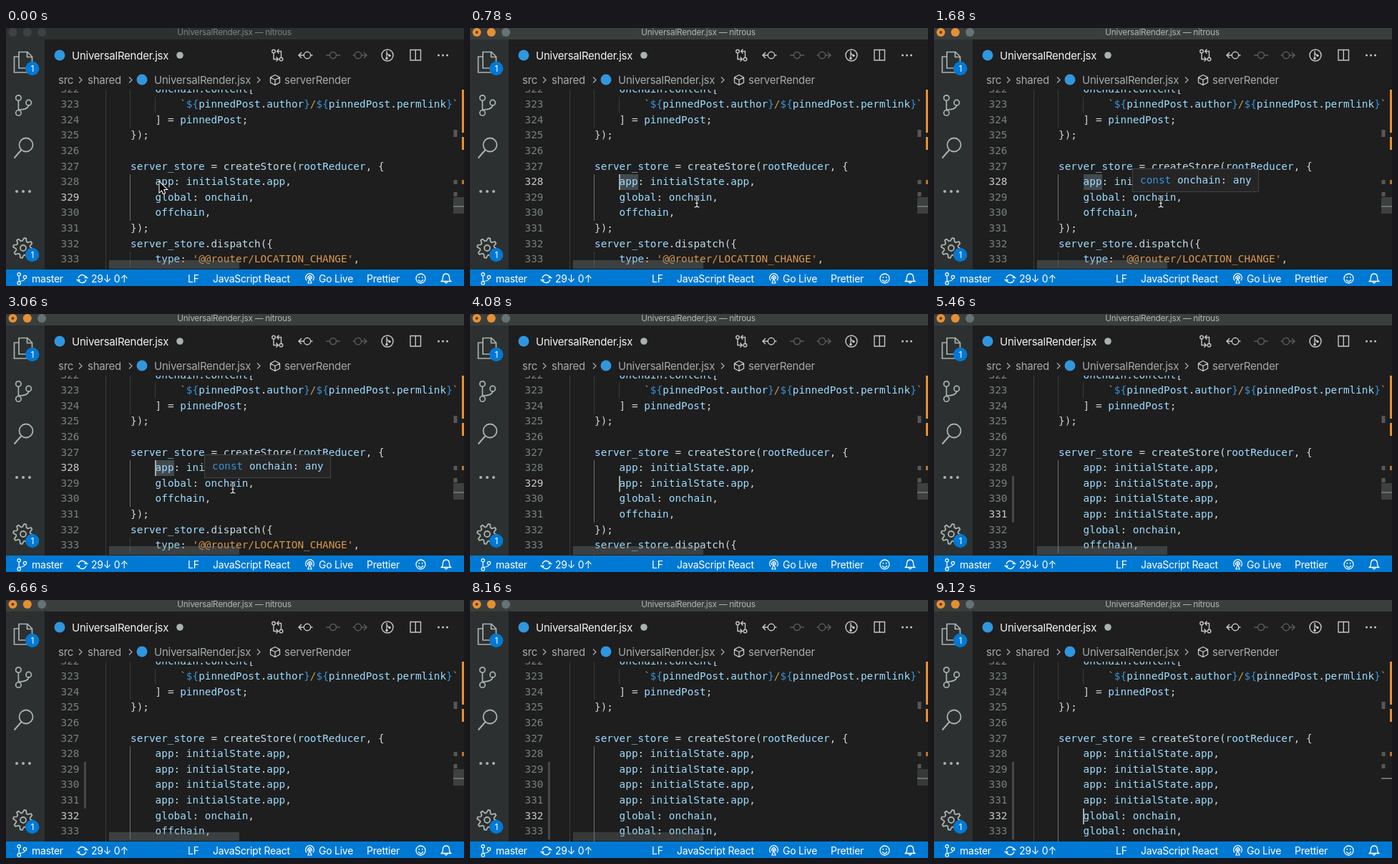
An HTML page with a canvas that plays this animation: 640 by 360 pixels, repeating every 9.18 s.

```html
<!DOCTYPE html>
<html lang="en">
<head>
<meta charset="utf-8">
<title>Code editor</title>
<style>
html, body { margin: 0; width: 100%; height: 100%; overflow: hidden; background: #1e1e1e; }
canvas { display: block; }
</style>
</head>
<body>
<canvas id="stage" width="640" height="360"></canvas>
<script>
const c = document.getElementById('stage').getContext('2d');
const LOOP = 9180, ROW = 21.6, CHAR = 8.65, LEFT = 139.4, FIRST = 322;
const MONO = '14.37px "DejaVu Sans Mono", monospace';
const SANS = 'px Inter, "Liberation Sans", sans-serif';
const GREY = '#c5c5c5', DIM = '#565c5a', SIDE = '#a9b3af', PANEL = '#2c3030';
const GUIDE = '#383c3b', SLIDER = 'rgba(121,130,128,.34)', BLUE = '#0079d4', ORANGE = '#e69035';
const COLORS = { v: '#9cdcfe', p: '#d0d4d6', k: '#3893d8', f: '#bfdcea', s: '#d8974a' };

// Events in ms
const CLICK = 300, COPY_APP = [3960, 4560, 5040], DOWN = 6180, COPY_GLOBAL = [6900, 7320];
const BLINK = [CLICK, 1680, 2160, 2580, 3060, 3480, 3960, 4440, 4560, 5460, 5940, 6660, 6900, 7800, 8280, 8700, 9120];

// Each ~x switches to colour x
const HEAD = [
  '        ~vonchain~p.~vcontent~p[',
  '            ~s`~k${~vpinnedPost~p.~vauthor~k}~s/~k${~vpinnedPost~p.~vpermlink~k}~s`',
  '        ~p] = ~vpinnedPost~p;',
  '    ~p});',
  '',
  '    ~vserver_store~p = ~fcreateStore~p(~vrootReducer~p, {'];
const APP = '        ~vapp~p: ~vinitialState~p.~vapp~p,';
const GLOBAL = '        ~vglobal~p: ~vonchain~p,';
const TAIL = [
  '        ~voffchain~p,',
  '    ~p});',
  '    ~vserver_store~p.~fdispatch~p({',
  "        ~vtype~p: ~s'@@router/LOCATION_CHANGE'~p,"];

const passed = (list, t) => list.filter(x => x <= t).length;
const clamp = x => Math.max(0, Math.min(1, x));
const ease = x => { x = clamp(x); return x * x * (3 - 2 * x); };
const rowTop = n => 204.3 + (n - 328) * ROW;

function box(x, y, w, h, color) {
  c.fillStyle = color;
  c.fillRect(x, y, w, h);
}
function disc(x, y, r, color) {
  c.fillStyle = color;
  c.beginPath();
  c.arc(x, y, r, 0, 7);
  c.fill();
}
function ring(x, y, r, color, a = 0, b = 7) {
  c.strokeStyle = color;
  c.beginPath();
  c.arc(x, y, r, a, b);
  c.stroke();
}
function line(d, color, width = 1.3) {
  c.lineWidth = width;
  c.strokeStyle = color;
  c.stroke(new Path2D(d));
}
function label(s, x, y, size, color, align = 'left') {
  c.font = size + SANS;
  c.letterSpacing = '-0.25px';
  c.textAlign = align;
  c.fillStyle = color;
  c.fillText(s, x, y);
}
function code(s, x, y) {
  c.font = MONO;
  c.letterSpacing = '0px';
  c.textAlign = 'left';
  s.split('~').forEach((part, i) => {
    c.fillStyle = COLORS[part[0]];
    if (i) part = part.slice(1);
    c.fillText(part, x, y);
    x += part.length * CHAR;
  });
}
function dots(x, y, gap, r, color) {
  for (let i = -1; i < 2; i++) disc(x + i * gap, y, r, color);
}
function badge(y) {
  disc(36.7, y, 9.7, BLUE);
  label('1', 36.7, y + 4.3, 12, '#fff', 'center');
}
function branch(x, y, s, color, width) {
  c.lineWidth = width;
  ring(x - 6 * s, y - 9 * s, 3.4 * s, color);
  ring(x - 6 * s, y + 10 * s, 3.4 * s, color);
  ring(x + 7 * s, y - 3 * s, 3.4 * s, color);
  line(`M${x - 6 * s} ${y - 5.6 * s}V${y + 6.6 * s}M${x + 7 * s} ${y + .4 * s}Q${x + 6 * s} ${y + 6 * s} ${x - 6 * s} ${y + 6 * s}`, color, width);
}

function titleBar(focused) {
  box(0, 0, 640, 16, focused ? '#3a3f3e' : PANEL);
  const lights = focused ? [ORANGE, ORANGE, '#647475'] : ['#3c4242', '#3c4242', '#3c4242'];
  lights.forEach((color, i) => disc(9.5 + 20.3 * i, 6, 6, color));
  if (focused) disc(9.5, 6, 2, '#6a3a10');
  label('UniversalRender.jsx — nitrous', 319, 10, 11.8, focused ? '#b0b4b3' : '#7c8482', 'center');
}

function sideBar() {
  box(0, 16, 54, 321, PANEL);
  line('M18 33.500H30L36.500 40V56H18ZM29.500 34V40.500H36M18 40H11.500V62H29.500V56', SIDE, 1.7);
  badge(56.5);
  branch(24, 107.5, 1.1, SIDE, 1.7);
  c.lineWidth = 1.8;
  ring(28, 163, 9.5, SIDE);
  line('M21.500 170L11.500 181.500', SIDE, 2);
  dots(24, 228, 9, 2, SIDE);
  c.beginPath();
  for (let i = 0; i < 32; i++) {
    const r = i % 4 < 2 ? 14 : 10, a = (i + .5) * Math.PI / 16;
    c.lineTo(24 + r * Math.cos(a), 307 + r * Math.sin(a));
  }
  c.closePath();
  c.lineWidth = 1.8;
  c.strokeStyle = SIDE;
  c.stroke();
  ring(24, 307, 4, SIDE);
  badge(316.5);
}

function tabs() {
  disc(75, 38, 7.5, '#2f97de');
  label('UniversalRender.jsx', 92, 44, 15, '#f2f2f2');
  disc(243, 38, 4.8, '#aab2b0');

  c.lineWidth = 1.4;
  ring(374, 32.500, 2.3, GREY);
  ring(384.500, 43.500, 2.3, GREY);
  line('M374 35V43.500H380M377.500 40.500L380.500 43.500L377.500 46.500M384.500 41V32.500H379M381.500 29.500L378.500 32.500L381.500 35.500', GREY, 1.4);
  ring(421, 38, 4.7, GREY);
  line('M416 38H409.500M413 34L409 38L413 42M426 38H428.500', GREY, 1.5);
  ring(457, 38, 4.5, DIM);
  line('M447 38H452M462 38H467', DIM, 1.5);
  ring(492, 38, 4.7, DIM);
  line('M484.500 38H487M497 38H503.500M500 34L504 38L500 42', DIM, 1.5);
  ring(533, 38, 8, GREY);
  line('M532 32V44M532 35L536 39', GREY, 1.4);
  disc(532, 42.500, 1.8, GREY);
  disc(536, 38.500, 1.8, GREY);
  line('M565 30.500H579.500V45H565ZM572.300 30.500V45', GREY, 1.4);
  dots(610.5, 38, 6, 1.5, GREY);

  const crumb = '#a4aaa8';
  label('src', 73, 78, 15, crumb);
  label('shared', 114, 78, 15, crumb);
  disc(190, 72, 7.5, '#2f97de');
  label('UniversalRender.jsx', 207, 78, 15, crumb);
  label('serverRender', 389, 78, 15, crumb);
  for (const x of [102, 172, 351]) line(`M${x} 68.500L${x + 4} 72.500L${x} 76.500`, crumb);
  line('M376 65.500L382.500 69V76L376 79.500L369.500 76V69ZM369.500 69L376 72.500L382.500 69M376 72.500V79.500', GREY);
}

function editor(t) {
  const apps = 1 + passed(COPY_APP, t), globals = 1 + passed(COPY_GLOBAL, t);
  const current = t < CLICK ? 329 : t < DOWN ? 327 + apps : 332;
  const lines = [...HEAD, ...Array(apps).fill(APP), ...Array(globals).fill(GLOBAL), ...TAIL];
  const last = 328 + apps + globals;

  c.save();
  c.beginPath();
  c.rect(54, 86, 586, 251);
  c.clip();
  box(139, 86, 1, 251, GUIDE);
  box(173, 74, 1, rowTop(325) - 74, GUIDE);
  box(208, rowTop(323), 1, ROW, GUIDE);
  box(173, 204, 1, rowTop(last + 1) - 204, '#6a706e');
  box(173, rowTop(last + 3), 1, ROW, GUIDE);

  const changed = t >= 7440 ? 5 : t >= 5340 ? 3 : t >= 4680 ? 2 : 0;
  box(109, rowTop(329), 3, changed * ROW, '#454a48');
  if (t >= 540 && t < COPY_APP[0]) box(209, 204, 26, 22, '#434a4d');

  for (let n = FIRST; n <= 333; n++) {
    const y = Math.round(rowTop(n) + 14.9);
    c.font = MONO;
    c.letterSpacing = '0px';
    c.textAlign = 'right';
    c.fillStyle = n === current ? '#c8cccb' : '#78827f';
    c.fillText(n, 102.5, y);
    code(lines[n - FIRST], LEFT, y);
  }
  if (passed(BLINK, t) % 2) box(208, Math.round(rowTop(current)), 2, 22, '#a4abaa');
  c.restore();

  c.globalAlpha = 1 - clamp((t - 7980) / 880);
  box(144, 324, 182, 12, SLIDER);
  box(625, 236, 15, 23, SLIDER);
  c.globalAlpha = 1;
  box(637, 86, 3, 60, ORANGE);
  box(637, 152, 3, 18, ORANGE);
  box(637, 212, 3, 6, '#b8752f');
  box(625.5, 142, 5, 10, '#535957');
  box(625.5, 212, 5, 6, '#535957');
  box(625.5, 229, 5, 6, '#535957');
  box(625, 248, 15, 2, '#66736f');
}

function tooltip(t) {
  if (t < 1080 || t >= COPY_APP[0]) return;
  c.globalAlpha = clamp((t - 1020) / 240);
  box(277, 196, 177, 33, '#454545');
  box(278, 197, 175, 31, '#252526');
  code('~kconst ~vonchain~p: ~vany', 288, 217);
  c.globalAlpha = 1;
}

function pointer(t) {
  if (t >= COPY_APP[0]) return;
  const a = ease((t - 60) / 240), b = ease((t - 360) / 420);
  const x = 214 - 4 * a + 107 * b, y = 214 + 2 * a + 24 * b;
  c.save();
  c.translate(x, y);
  if (t < CLICK) {
    const arrow = new Path2D('M0.500 1V15L3.700 12L6 17L8 16L6 11H10.500Z');
    c.lineWidth = 2;
    c.strokeStyle = '#fff';
    c.stroke(arrow);
    c.fillStyle = '#000';
    c.fill(arrow);
  } else {
    const beam = 'M-3.500 -6Q0 -6 0 -4V8Q0 10 -3.500 10M3.500 -6Q0 -6 0 -4M0 8Q0 10 3.500 10M-2 4.500H2';
    line(beam, '#111', 3);
    line(beam, '#e4e4e4', 1.2);
  }
  c.restore();
}

function statusBar() {
  const w = '#fff', y = 355;
  box(0, 337, 640, 23, BLUE);
  branch(22, 349.5, .64, w, 1.2);
  label('master', 36, y, 14, w);
  c.lineWidth = 1.4;
  ring(106.5, 350, 5.5, w, 3.3, 5.9);
  ring(106.5, 350, 5.5, w, .2, 2.8);
  line('M109.500 348.500H114.500M112 346V349M98.500 351.500H103.500M101 354V351', w);
  label('29↓ 0↑', 119, y, 14, w);
  label('LF', 254, y, 14, w);
  label('JavaScript React', 289, y, 14, w);
  ring(424.5, 348.5, 5.8, w, 2.4, 7);
  ring(424.5, 348.5, 2.8, w, 2.4, 7);
  disc(424.5, 348.5, 1.3, w);
  line('M424.500 349L422 356H427Z', w, 1.2);
  label('Go Live', 437, y, 14, w);
  label('Prettier', 504, y, 14, w);
  c.lineWidth = 1.3;
  ring(579.5, 349.5, 6.5, w);
  ring(579.5, 350, 3.5, w, .3, 2.8);
  disc(577.3, 347.8, .9, w);
  disc(581.7, 347.8, .9, w);
  line('M608.500 353.500Q610.500 352 610.500 347.500Q611 343 615 343Q619 343 619.500 347.500Q619.500 352 621.500 353.500ZM613 354Q615 358 617 354', w);
}

function frame(now) {
  const t = now % LOOP;
  box(0, 0, 640, 360, '#1e1e1e');
  titleBar(t >= CLICK);
  sideBar();
  tabs();
  editor(t);
  tooltip(t);
  pointer(t);
  statusBar();
  requestAnimationFrame(now => frame(Math.max(0, now - start)));
}
const start = performance.now();
frame(0);
</script>
</body>
</html>
```
